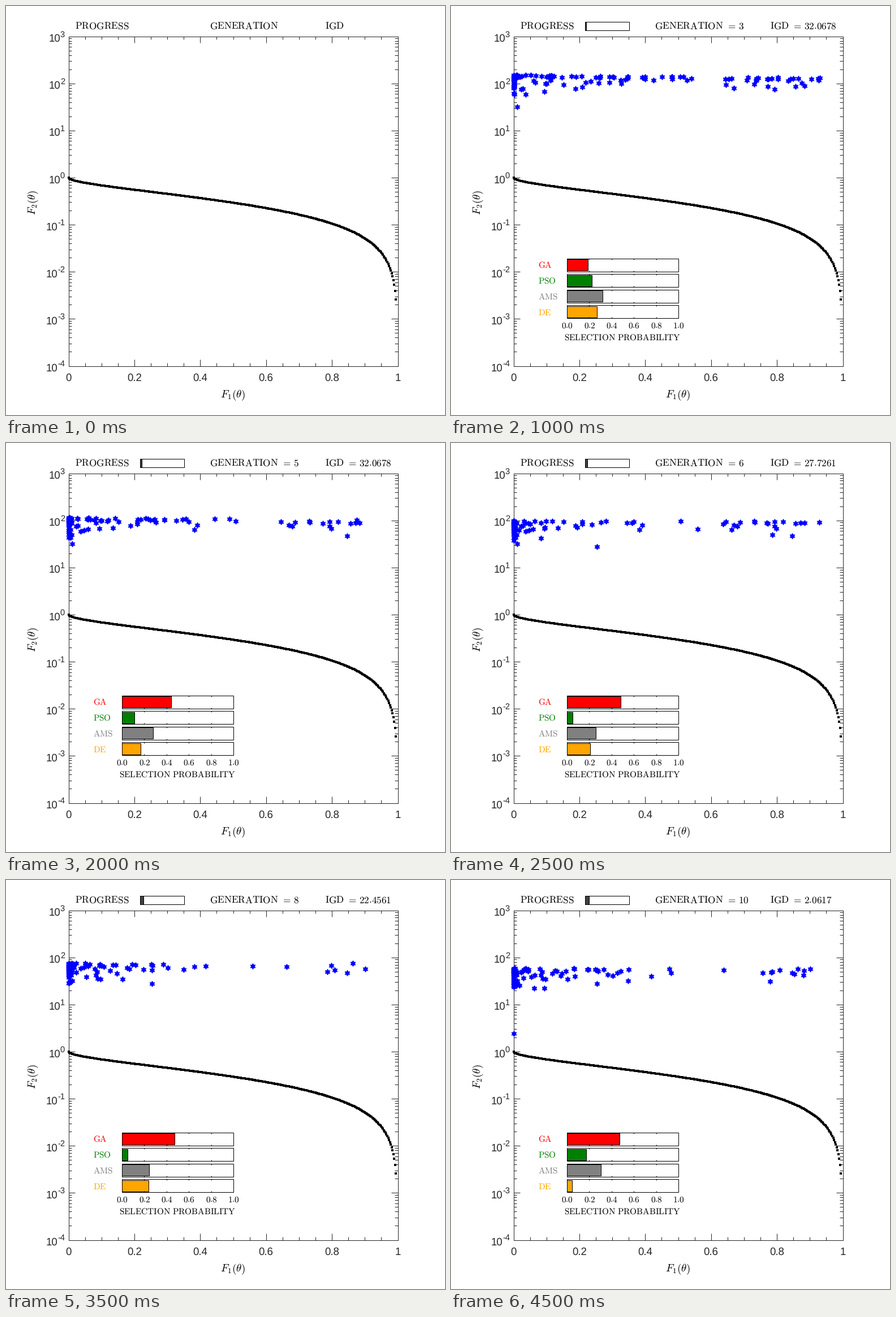
Animation of 776x722 px, one loop 5000 ms. Source, as a matplotlib script:

```python
import numpy as np
import matplotlib.pyplot as plt
from matplotlib.animation import FuncAnimation
from matplotlib.collections import LineCollection
from matplotlib.patches import Rectangle
from matplotlib.path import Path

W, H, DPI = 776, 722, 100
PX = 72 / DPI
INK = "#262626"
X0, Y0, SIDE = 110.5, 53.5, 582
X1, Y1 = X0 + SIDE, Y0 + SIDE
BX, BW = 205, 197
SANS = "Liberation Sans"

plt.rcParams.update({"mathtext.fontset": "cm", "text.hinting": "no_hinting"})
fig = plt.figure(figsize=(W / DPI, H / DPI), dpi=DPI, facecolor="white")
ax = fig.add_axes([0, 0, 1, 1])
ax.set_xlim(0, W)
ax.set_ylim(H, 0)
ax.axis("off")


def px_of(f1):
    return X0 + SIDE * f1


def py_of(f2):
    return Y0 + SIDE * (3 - np.log10(f2)) / 7


def label(x, y, s, size, color="black", ha="left", **kw):
    return ax.text(x, y, s, fontsize=size * PX, color=color, ha=ha,
                   va="baseline", **kw)


def upright(s):
    return r"$\mathrm{%s}$" % s.replace(" ", r"\ ")


def equals(value):
    return upright(r"=\hspace{0.18}" + value)


def roman(x, y, s, size=17.2, **kw):
    return label(x, y, upright(s), size, **kw)


def box(x, y, w, h, face="none", edge="black", z=3):
    r = Rectangle((x, y), w, h, facecolor=face, edgecolor=edge,
                  linewidth=PX, zorder=z)
    return ax.add_patch(r)


def strokes(segs, color, z):
    c = LineCollection(segs, colors=color, linewidths=PX, zorder=z)
    return ax.add_collection(c)


def draw_axes():
    box(X0, Y0, SIDE, SIDE, edge=INK, z=1)
    segs = []
    for k in range(21):
        x, n = px_of(k / 20), 11.6 if k % 4 == 0 else 5.8
        segs += [[(x, Y0), (x, Y0 + n)], [(x, Y1), (x, Y1 - n)]]
        if k % 4 == 0:
            label(x, 661.5, "%g" % (k / 20), 18.67, INK, "center",
                  family=SANS)
    for e in range(-4, 4):
        for m in range(1, 10 if e < 3 else 2):
            y, n = py_of(m * 10.0 ** e), 11.6 if m == 1 else 5.8
            segs += [[(X0, y), (X0 + n, y)], [(X1, y), (X1 - n, y)]]
        y = py_of(10.0 ** e)
        label(104, y + 1, str(e), 14.67, INK, "right", family=SANS)
        label(91 if e < 0 else 95.9, y + 9.5, "10", 18.67, INK, "right",
              family=SANS)
    strokes(segs, INK, 1)

    label(401, 691.5, r"$F_1(\theta)$", 19, ha="center")
    label(52, 347, r"$F_2(\theta)$", 19, ha="center", rotation=90,
          rotation_mode="anchor")

    f1 = np.linspace(0, 0.9948, 374)
    ax.plot(px_of(f1), py_of(1 - np.sqrt(f1)), "s", color="black",
            markersize=4 * PX, markeredgewidth=0, zorder=2)


draw_axes()
for x, s in [(122.4, "PROGRESS"), (360.5, "GENERATION"), (564.5, "IGD")]:
    roman(x, 41, s)

# Parts that appear once the run has started
meter = box(237.2, 27.5, 0, 15, face="#404040", z=4)
gen_text = label(486, 41, "", 17.2)
igd_text = label(602.2, 41, "", 17.2)
late = [box(237.2, 27.5, 78, 15, z=5), meter, gen_text, igd_text]

bars = []
methods = [("GA", "red"), ("PSO", "green"), ("AMS", "gray"), ("DE", "orange")]
for i, (name, color) in enumerate(methods):
    top = 445.5 + 27.6 * i
    low = top + 23
    bars.append(box(BX, top + 1.4, 0, 20, face=color, z=4))
    late.append(box(BX, top, BW, low - top, z=5))
    segs = []
    for x in BX + BW * np.arange(0.2, 0.9, 0.2):
        segs += [[(x, top), (x, top + 2)], [(x, low), (x, low - 2)]]
    late.append(strokes(segs, "black", 5))
    late.append(roman(154.5, top + 17.6, name, 15.3, color=color))
late += bars
for k in range(6):
    late.append(roman(BX + 0.5 + BW * k / 5, 568.5, "%.1f" % (k / 5), 15.3,
                      ha="center"))
late.append(roman(303, 591, "SELECTION PROBABILITY", 15.3, ha="center"))

ang = np.pi * np.arange(13) / 6
rad = np.where(np.arange(13) % 2, 1 / np.sqrt(3), 1)
star = Path(np.column_stack([rad * np.sin(ang), rad * np.cos(ang)]),
            closed=True)
swarm, = ax.plot([], [], linestyle="none", marker=star, color="blue",
                 markersize=9.8 * PX, markeredgewidth=PX, zorder=6)
late.append(swarm)


def ceiling(g, x):
    """Height of the worst surviving member; it sinks each generation."""
    tilt = 8 - 16 * np.exp(-(x - X0) / 120)
    return 118 + 4.8 * (g - 2) + tilt / (g - 1) ** 2


def breed():
    """Rows of x, y and generation of birth."""
    rng = np.random.default_rng(4)
    rows = []
    for g in range(2, 11):
        n = 110 if g == 2 else 40
        reach = np.maximum(0, 1.2 * rng.random(n) - 0.2)
        x = X0 + 550 * reach ** (2.3 + 0.4 * (g - 2))
        depth = 4 + 0.6 * g + 6 * np.exp(-(x - X0) / 30)
        y = ceiling(g, x) + np.minimum(rng.exponential(depth), 35)
        rows.append(np.column_stack([x, y, np.full(n, g)]))
    # Lone members far from the crowd
    rows.append([(650, 131, 2), (486, 139, 2), (165, 151, 2), (117, 178, 3),
                 (609, 142, 3), (333, 153, 4), (258, 183, 6), (568, 162, 6),
                 (623, 168, 9), (X0, 271, 10)])
    return np.vstack(rows)


POOL = breed()


def population(g):
    x, y, born = POOL.T
    alive = (born <= g) & (y >= ceiling(g, x))
    return x[alive], y[alive]


KEYS = [2, 3, 4, 6, 8, 10]
GA = [.185, .19, .405, .482, .47, .473]
PSO = [.368, .222, .173, .05, .05, .172]
AMS = [.2, .32, .3, .26, .243, .307]
IGD = {2: 62.5972, 3: 32.0678, 6: 27.7261, 7: 22.4561, 10: 2.0617}


def shares(g):
    p = [np.interp(g, KEYS, s) for s in (GA, PSO, AMS)]
    return p + [1 - sum(p)]


def update(i):
    for a in late:
        a.set_visible(i > 0)
    if i > 0:
        g = i + 1
        meter.set_width(0.78 * (g - 1))
        gen_text.set_text(equals(str(g)))
        igd = IGD[max(k for k in IGD if k <= g)]
        igd_text.set_text(equals("%.4f" % igd))
        for bar, s in zip(bars, shares(g)):
            bar.set_width(BW * s)
        swarm.set_data(*population(g))
    return late


anim = FuncAnimation(fig, update, frames=10, interval=500, repeat=True,
                     repeat_delay=0, blit=False)
plt.show()
```
